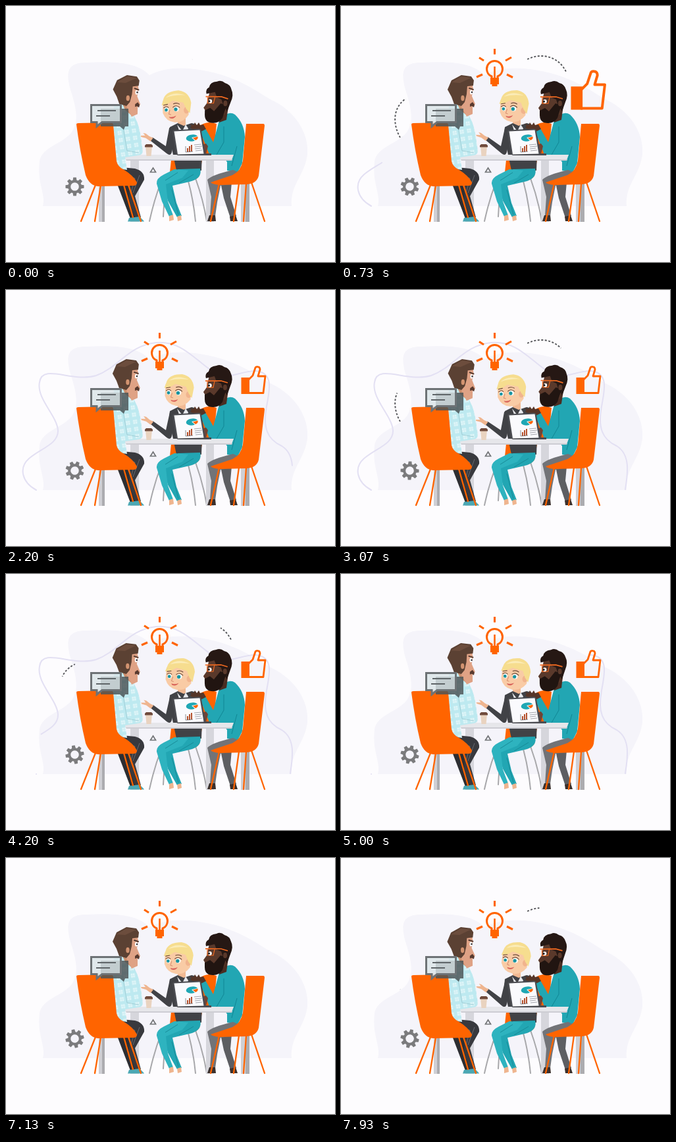
These frames come from a looping animation (500 by 389 pixels, 8000 ms). An HTML page:

```html
<!DOCTYPE html>
<html lang="en">
<head>
<meta charset="utf-8">
<title>Team meeting</title>
<style>
html, body { margin: 0; width: 100%; height: 100%; overflow: hidden; background: #fdfcfe; }
svg { display: block; width: 100%; height: 100%; }
.line { fill: none; stroke-linecap: round; stroke-linejoin: round; }
.orange { fill: #ff6400; }
.orange-line { fill: none; stroke: #ff6400; }
.teal { fill: #22a6b3; }
.dark { fill: #414246; }
</style>
</head>
<body>
<svg viewBox="0 0 500 389">
  <defs>
    <pattern id="plaid" width="11" height="11" patternUnits="userSpaceOnUse" patternTransform="rotate(-9)">
      <rect width="11" height="11" fill="#e2f6f9"/>
      <path d="M0 3H11M3 0V11" stroke="#a5e1ea" stroke-width="5" opacity=".6"/>
      <path d="M0 8.5H11M8.500 0V11" stroke="#c3e9ef" stroke-width=".6"/>
    </pattern>
    <mask id="maskLeft" maskUnits="userSpaceOnUse" x="70" y="125" width="50" height="90">
      <path id="trimLeft" class="line" stroke="#fff" stroke-width="6" style="stroke-linecap:butt"/>
    </mask>
    <mask id="maskRight" maskUnits="userSpaceOnUse" x="270" y="65" width="90" height="50">
      <path id="trimRight" class="line" stroke="#fff" stroke-width="6" style="stroke-linecap:butt"/>
    </mask>
  </defs>

  <!-- backdrop -->
  <path fill="#f5f4fa" d="M56 304C61 286 47 270 51 236C55 214 83 211 99 193C114 174 104 147 97 124C91 99 94 86 122 86C163 84 199 85 218 105C241 93 269 92 300 98C350 107 377 127 402 142C438 158 461 193 458 225C455 256 431 272 434 304Z"/>
  <path id="curve" class="line" stroke="#e3e0f3" stroke-width="2" d="M46 304C24 292 19 270 35 256C54 240 80 234 79 213C77 190 46 165 51 140C55 111 101 141 137 130C171 118 186 84 228 80C266 77 284 103 313 123C338 140 356 122 380 123C408 126 400 154 396 177C390 209 397 227 419 237C440 250 436 278 432 303"/>

  <g class="line" stroke="#55565a" stroke-width="1.9" stroke-dasharray="3 2.5" style="stroke-linecap:butt">
    <g mask="url(#maskLeft)"><path id="arcLeft" d="M90 200C79 181 76 151 105 137"/></g>
    <g mask="url(#maskRight)"><path id="arcRight" d="M283 81C306 70 332 77 343 102"/></g>
  </g>

  <g id="bulb">
    <g class="orange-line" stroke-width="3.1">
      <path d="M233.500 65V73.500M210 78.500L217 83M250 83L259 78M206 108L215 104M252 104L261 108.500"/>
      <path d="M229 110V107C224 105 221.500 100 221.500 95.500A12 12 0 0 1 245.500 95.500C245.500 100 243 105 238 107V110"/>
      <path stroke-width="2.6" d="M233.500 92V110"/>
    </g>
    <path class="orange" d="M227 109H240V119H237.500V122H229.500V119H227Z"/>
  </g>

  <g id="thumb">
    <path class="orange" d="M357.500 133H370V158H357.500Z"/>
    <path class="orange-line" stroke-width="2.8" stroke-linejoin="round" d="M369 136L375 130L379 118Q380 116 384 117Q386 118 386 121L383 131H394L391 156.500H368"/>
  </g>

  <g id="gear" fill="#7b7b7d">
    <circle r="8.300" fill="none" stroke="#7b7b7d" stroke-width="4"/>
    <g id="teeth"></g>
  </g>
  <path d="M223.500 246L227.500 252.500H219.500Z" fill="none" stroke="#727477" stroke-width="1.7"/>

  <!-- rear table legs and chair -->
  <path fill="#cfcfd4" d="M141 266H150V328H141ZM357 260H370V328H357Z"/>
  <path fill="#acacb0" d="M146 266H150V328H146ZM364 260H370V328H364Z"/>
  <path class="orange" d="M296 181Q307 174 320 179L315 230H285ZM251 234H298L294 258Q288 268 264 267L248 262Z"/>
  <path class="line" stroke="#a7a7aa" stroke-width="2" d="M236 266Q225 295 218 327M243 268Q240 300 239 320M277 266Q285 296 288 327M288 262Q300 295 305 327"/>

  <!-- woman -->
  <g>
    <path fill="#f1b993" d="M261 170H273V188H261Z"/>
    <path class="dark" d="M249 184L261 178L270 182L282 178Q296 180 299 199L297 250L259 250L252 217Q246 204 249 184Z"/>
    <path fill="#e9eaee" d="M260 180L268 190L273 180L277 186L270 210Z"/>
    <g id="womanArm">
      <path class="dark" d="M249 185L258 188L252 222Q250 229 244 224L220 204L223 199L243 213Z"/>
      <path fill="#efb58f" d="M220 205L213 200L206 198L205 196L212 196L209 192L213 193L218 197L224 200Z"/>
    </g>
    <path class="teal" d="M262 248L295 247Q299 262 279 267L253 273L259 299L267 319L260 321L246 296L239 271Q238 260 262 248Z"/>
    <path fill="#2eb3bf" d="M256 248L277 250L268 261L243 271L246 297L254 318L248 320L237 297L229 270Q228 262 240 256Z"/>
    <path d="M261 253L242 265M252 279L262 317M285 256L263 269" fill="none" stroke="#178794" stroke-width=".9"/>
    <path fill="#efb58f" d="M248 319L254 317L255 325L248 327ZM260 320L266 318L267 325L261 327Z"/>
    <g id="womanHead">
      <path fill="#f9cba5" d="M241 143L266 139L280 151L279 166Q270 178 257 176Q244 174 240 161Z"/>
      <ellipse cx="276" cy="159" rx="4" ry="5" fill="#f1b48e"/>
      <path fill="#f6dd8f" d="M239 149L243 138Q248 128 266 128Q282 131 284 148L281 164L276 157L272 147L256 143L247 148Z"/>
      <path fill="#fbecb8" d="M246 138Q258 128 276 136Q259 134 246 138Z"/>
      <ellipse cx="246" cy="156" rx="3" ry="3.6" fill="#fff"/>
      <ellipse cx="261" cy="156" rx="3.8" ry="3.8" fill="#fff"/>
      <circle cx="245.500" cy="156.500" r="2.4" fill="#1894a0"/>
      <circle cx="260" cy="156.500" r="2.7" fill="#1894a0"/>
      <path class="line" stroke="#6a4938" stroke-width="1.1" d="M242 153Q246 150 249 153M256 153Q261 149 266 154M242 149L248 148M257 148Q262 146 266 149"/>
      <path class="line" stroke="#d78e70" stroke-width="1" d="M251 157L249 163L252 164"/>
      <path fill="#d8625a" d="M249 167Q254 169 260 166Q256 172 250 169Z"/>
    </g>
  </g>

  <!-- man on the right -->
  <path class="teal" d="M324 174Q337 158 348 165Q362 178 363 199L359 239L352 253L336 250L336 237L327 226L310 228L295 190L303 186L315 207Z"/>
  <path d="M331 183L331 207L320 226M351 213L343 243" fill="none" stroke="#118694" stroke-width="1"/>
  <path fill="#563527" d="M296 191L288 189L280 185L282 182L279 179L285 181L287 177L290 181L293 177L295 181L300 180L304 187Z"/>
  <g id="rightHead">
    <path fill="#4a2d22" d="M323 151H338L335 173L324 177Z"/>
    <path fill="#5a392b" d="M309 130L330 126L338 144L332 165L318 171L303 160L300 155L305 148Z"/>
    <path fill="#261814" d="M304 134Q302 127 308 124Q309 116 320 115Q326 112 332 117Q340 119 342 127Q346 135 341 146L336 160L330 151L327 142L320 139L317 131Z"/>
    <path fill="#211511" d="M302 159L310 155L316 160L326 148L335 151L329 170Q322 181 308 177Q302 174 302 166Z"/>
    <path d="M303 138L327 138L337 141" fill="none" stroke="#f16a20" stroke-width="1.7"/>
    <path d="M306 139V148H315L317 139" fill="none" stroke="#f16a20" stroke-width="1.2"/>
    <ellipse cx="310" cy="145" rx="2.8" ry="3" fill="#fff"/>
    <circle cx="308.500" cy="145" r="1.6" fill="#241c1a"/>
    <ellipse cx="333" cy="148" rx="3" ry="4.300" fill="#5a392b"/>
  </g>

  <!-- table and objects -->
  <path fill="#d6d6dc" d="M189 232H202V328H189ZM304 232H316V328H304Z"/>
  <path fill="#e6e6ea" d="M178 226H346L343 234H182Z"/>
  <path fill="#cdcdd3" d="M182 233H344L343 235H183Z"/>
  <path fill="#e9d3c0" d="M212 213H222L220.500 228H213.500Z"/>
  <path fill="#704b3c" d="M211 212L213 210H221L223 212V214.500H211Z"/>
  <path fill="#704334" d="M297 211L304 209L307 213L304 225L298 224Z"/>
  <path fill="#4b4c51" d="M253 191Q253 188.500 256 188.500L293 186.500Q296 186.500 297 190L303 224L312 224V227H262Q259 227 258 223Z"/>
  <path fill="#fafafd" d="M255.500 190.500L294.500 188.500L300.500 224.500L261 225.500Z"/>
  <path fill="#1fa7b4" d="M274 200A9 5.200 -8 0 1 291 198L282 200L287 204.500A9 5.200 -8 0 1 274 200Z"/>
  <path class="orange" d="M284 200.500L291.500 198.500Q292.500 202 288 204Z"/>
  <path fill="#b5512c" d="M275 216H277V222H275ZM278 213H280V222H278ZM281 211H283V221H281Z"/>
  <path d="M273 213V222L284 221" fill="none" stroke="#5e5f64" stroke-width=".7"/>
  <path d="M286 211L297 210M287 214L298 213M287 217L296 216M288 220L298 219" stroke="#a5a6ac" stroke-width="1"/>

  <!-- man on the left -->
  <path fill="#2d2e32" d="M168 268L186 266L190 288L200 321L189 323Z"/>
  <path fill="#38393e" d="M165 244L196 247Q211 251 210 264L196 289L205 321L197 324L187 296L188 270L168 272Z"/>
  <path d="M183 256L196 262L190 284M203 257L193 284" fill="none" stroke="#73757b" stroke-width=".8"/>
  <path fill="#4ba8b4" d="M187 322L203 320L209 326L210 327.500H185Z"/>
  <path fill="url(#plaid)" d="M164 151L179 149L190 160Q202 175 205 199L208 220Q208 226 201 227L181 230L184 249L162 246Z"/>
  <path d="M177 179L184 220L202 223" fill="none" stroke="#9ccbd3" stroke-width=".9"/>
  <g id="leftHead">
    <path fill="#c98e6d" d="M174 142L190 142L191 166L181 158Z"/>
    <path fill="#dfa285" d="M184 119L199 115L201 126L199 137L204 149L200 153L200 164L191 168L182 151Z"/>
    <path fill="#5b4133" d="M162 127L168 113L183 105L198 107L202 113L201 121L192 122L191 134L188 146L183 152L172 149L168 138Z"/>
    <path fill="#6c4d3d" d="M168 116L183 107L198 109L181 117Z"/>
    <ellipse cx="185" cy="140" rx="2.700" ry="4.300" fill="#d29370"/>
    <ellipse cx="198" cy="131" rx="2" ry="3.500" fill="#fff"/>
    <circle cx="199" cy="131" r="1.300" fill="#303137"/>
    <path class="line" stroke="#51382e" stroke-width="1.900" d="M195 125L201 127"/>
    <path fill="#583a2f" d="M196 149L200 146L203 150L202 154L199 152L196 153Z"/>
  </g>

  <!-- legs of the man on the right -->
  <path fill="#5d5e62" d="M326 268H343L341 290L350 319L341 322L331 292Z"/>
  <path fill="#727377" d="M306 264Q312 257 345 249L359 255L351 269L326 273L321 298L318 319L310 319L312 290Z"/>
  <path fill="#3b302d" d="M309 318H318L319 327H306ZM340 320L349 318L352 327H341Z"/>

  <!-- front chairs -->
  <path class="orange" d="M107 180Q107 178 110 178L160 177Q162 177 163 180L168 236Q170 244 178 248Q193 257 199 268Q199 273 194 273L140 274Q127 273 121 257Q112 219 107 180Z"/>
  <path class="orange" d="M365 179L391 179Q393 179 393 182L384 258Q381 270 366 271L325 272Q314 271 311 268L344 257Q357 251 360 235Z"/>
  <path class="orange-line" stroke-width="2.300" stroke-linecap="round" d="M136 272L114 327M144 273L135 327M179 272L193 321M186 272L205 327M324 270L311 327M354 270L346 327M365 270L361 327M373 268L393 327"/>

  <!-- speech bubbles -->
  <path fill="#4c5557" opacity=".84" d="M144 156H186V183H181L179 188L173 183H144Z"/>
  <path fill="#dbe5e8" fill-opacity=".8" stroke="#6d7275" stroke-width="3" d="M129.500 150.500H174.500V176.500H146L138 183V176.500H129.500Z"/>
  <path d="M139 159H167M137 167H158" stroke="#5f6568" stroke-width="2"/>
</svg>
<script>
const LOOP = 8000, DASH_PERIOD = 2600;
const $ = id => document.getElementById(id);
const clamp = x => Math.max(0, Math.min(1, x));
const progress = (t, from, to) => clamp((t - from) / (to - from));
const smooth = x => x * x * (3 - 2 * x);
const easeOut = x => 1 - (1 - x) ** 2;
const transform = (id, value) => $(id).setAttribute("transform", value);
const scaleAt = (id, x, y, s) => transform(id, `translate(${x} ${y}) scale(${s}) translate(${-x} ${-y})`);

// Shows only the part of a path between two fractions of its length.
function trim(id, from, to) {
  const path = $(id), length = path.getTotalLength();
  path.style.visibility = to - from > 0.002 ? "visible" : "hidden";
  path.style.strokeDasharray = `0 ${from * length} ${(to - from) * length} ${length * 2}`;
}

// Eased value through [time, value] pairs.
function keyed(t, keys) {
  const next = keys.findIndex(key => key[0] > t);
  if (next < 0) return keys[keys.length - 1][1];
  if (next === 0) return keys[0][1];
  const [[t0, v0], [t1, v1]] = [keys[next - 1], keys[next]];
  return v0 + (v1 - v0) * smooth(progress(t, t0, t1));
}

function trimArc(id, phase, delay) {
  trim(id, progress(phase, 1100, 1900), easeOut(progress(phase, delay, delay + 900)));
}

function draw(t) {
  scaleAt("bulb", 233, 100, keyed(t, [[50, 0], [600, 1]]));
  scaleAt("thumb", 377, 159, keyed(t, [[150, 0], [700, 1.42], [1050, 1], [6130, 1], [6440, 1.42], [7100, 0]]));
  trim("curve", smooth(progress(t, 3850, 5600)), smooth(progress(t, 250, 2500)));
  trimArc("trimRight", t % DASH_PERIOD, 0);
  trimArc("trimLeft", t % DASH_PERIOD, 130);

  const sway = -Math.cos((t - 3100) / 3250 * 2 * Math.PI);
  transform("gear", `translate(104.500 274.500) rotate(${t * 0.03})`);
  transform("womanHead", `translate(${1 + sway * 1.5} 0) rotate(${sway * 4} 267 180)`);
  transform("womanArm", `rotate(${sway * 1.5} 246 218)`);
  transform("leftHead", `rotate(${-sway} 181 160)`);
  transform("rightHead", `rotate(${-sway} 331 170)`);
}

for (const side of ["Left", "Right"]) $("trim" + side).setAttribute("d", $("arc" + side).getAttribute("d"));
$("teeth").innerHTML = Array.from({ length: 8 }, (_, i) =>
  `<path transform="rotate(${i * 45})" d="M-3 -9L-2.300 -14H2.300L3 -9Z"/>`).join("");

const start = performance.now();
function frame() {
  draw((performance.now() - start) % LOOP);
  requestAnimationFrame(frame);
}
frame();
</script>
</body>
</html>
```
